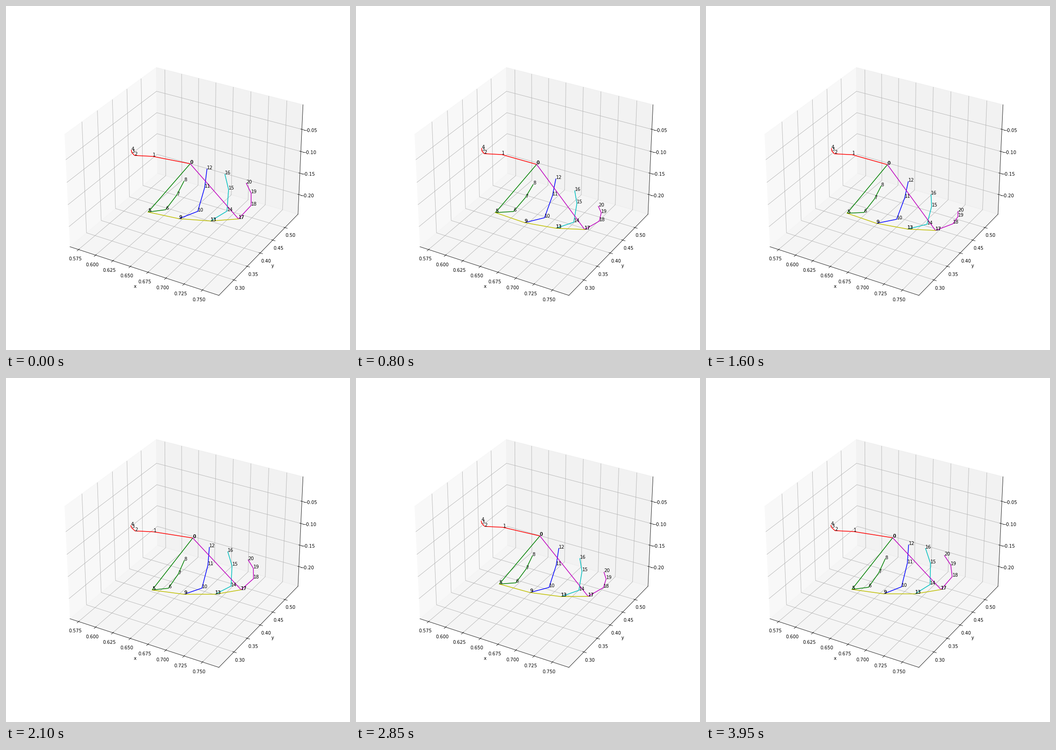
A matplotlib script for the animation above (4000 ms loop, 748x748 px).

```python
import numpy as np
import matplotlib.pyplot as plt
from matplotlib.animation import FuncAnimation

SIZE, DPI, STEP, FRAMES = 748, 72, 50, 80

# Resting hand in pixels: wrist, thumb, then index to pinky, knuckle to tip.
WRIST = np.array([400.5, 343])
THUMB = np.array([(319, 327), (279.5, 325), (273.5, 318.5), (272.5, 313.5)])
FINGERS = np.array([
    [(309, 448), (347, 443), (371, 411.5), (387, 381)],
    [(376, 462.5), (417, 446.5), (432, 394.5), (437, 354.5)],
    [(445, 467.5), (480.5, 446), (484, 399), (476, 366)],
    [(505.5, 463), (533, 433.5), (533, 407), (522.5, 385.5)],
])

# Strength of each hand movement over time (ms).
TIMES = [0, 550, 800, 1600, 2100, 2850, 3300, 3950]
MOVES = {
    'roll': [0, .23, .92, 1, -.1, .47, .27, -.12],
    'drop': [0, .03, .1, .2, 1, 0, .75, .9],
    'sway': [0, -.2, -.9, -.5, 1.05, .2, .65, 1],
    'curl': [0, .2, .75, 1, .35, .7, .4, .1],
    'lean': [0, .1, .4, 1, -.05, .55, .1, -.3],
}

CHAINS = [
    ('r', [0, 1, 2, 3, 4]),
    ('g', [0, 5, 6, 7, 8]),
    ('b', [9, 10, 11, 12]),
    ('c', [13, 14, 15, 16]),
    ('m', [0, 17, 18, 19, 20]),
    ('y', [5, 9, 13, 17]),
]


def shift(dx, dy):
    return np.stack(np.broadcast_arrays(dx, dy), axis=-1)


def pose(ms):
    roll, drop, sway, curl, lean = (
        np.interp(ms, TIMES, keys) for keys in MOVES.values())
    u = np.linspace(0, 1, 4)[:, None]   # across the palm, index to pinky
    v = np.linspace(0, 1, 4)            # along a finger, knuckle to tip

    palm = shift(sway * (8.5 - 3.4 * u + 14 * u * (1 - u)) + roll * (2 - 6 * u),
                 13 * drop * (1 - u) + 25 * roll * u)
    bend = shift(v * (lean * (40 * u - 8) - 8 * sway * (1 - u)),
                 v ** .8 * curl * (8 + 28 * u))
    fingers = FINGERS + palm + bend
    thumb = THUMB + shift(sway * (2 - 3 * v), 7 * drop - 5 * roll)
    wrist = WRIST + shift(5 * sway - 3.5 * roll, 5 * drop + roll)
    return np.vstack([wrist, thumb, fingers.reshape(-1, 2)])


fig = plt.figure(figsize=(SIZE / DPI, SIZE / DPI), dpi=DPI)

# The default subplot area of a 10.4 inch figure.
scale = 10.4 * DPI / SIZE
area = scale * np.array([.125, .11, .775, .77])
box = fig.add_axes(tuple(area), projection='3d')
box.set_xticks(np.linspace(.575, .75, 8))
box.set_yticks(np.linspace(.3, .5, 5))
box.set_zticks(np.linspace(-.2, -.05, 4))
box.set_xlim(.5622, .7721)
box.set_ylim(.2453, .5551)
box.set_zlim(-.2466, .0047)
box.set_xlabel('x')
box.set_ylabel('y')

# The hand lies on a flat layer in pixel units over the 3D box.
layer = fig.add_axes([0, 0, 1, 1], zorder=2)
layer.set_xlim(0, SIZE)
layer.set_ylim(SIZE, 0)
layer.axis('off')

lines = [layer.plot([], [], color=color)[0] for color, _ in CHAINS]
# Joints shared by several chains get one label per chain.
labels = [(j, layer.text(0, 0, str(j))) for _, chain in CHAINS for j in chain]


def update(frame):
    points = pose(frame * STEP)
    for line, (_, chain) in zip(lines, CHAINS):
        line.set_data(*points[chain].T)
    for joint, label in labels:
        label.set_position(points[joint])
    return lines + [label for _, label in labels]


anim = FuncAnimation(fig, update, frames=FRAMES, interval=STEP,
                     repeat=True, repeat_delay=0, blit=False)
plt.show()
```
